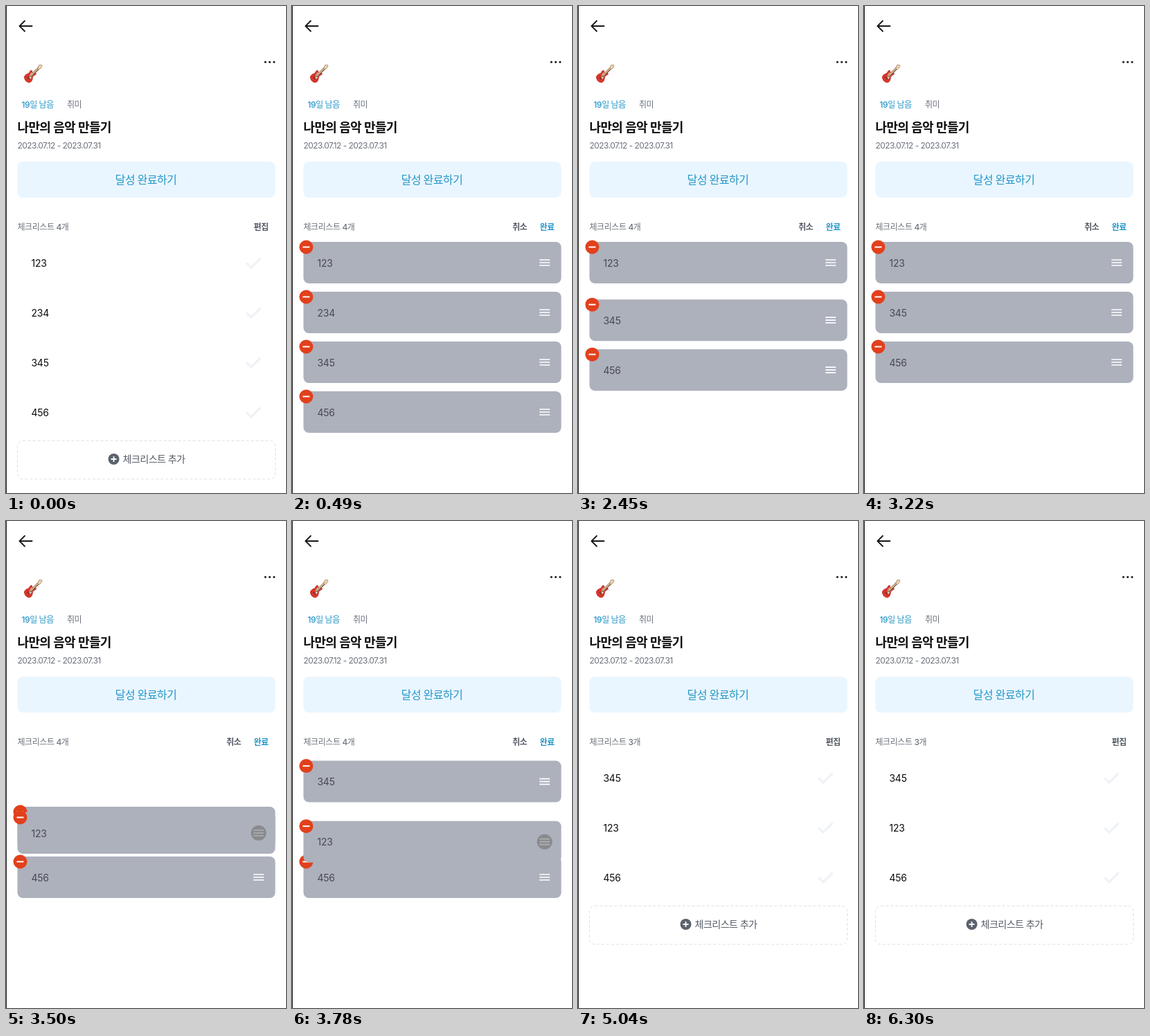
Recreate the animation shown at these times as an HTML page. Size 404 by 704 pixels, loop 7000 ms.

```html
<!DOCTYPE html>
<html lang="ko">
<head>
<meta charset="utf-8">
<style>
  html, body { margin: 0; width: 100%; height: 100%; overflow: hidden; background: #fff; }
  svg { display: block; width: 404px; height: 704px; }
  text { font-family: Inter, "Noto Sans CJK KR", "Noto Sans CJK", sans-serif; font-size: 12px; letter-spacing: -.035em; fill: #6b717c; }
  .semi { font-weight: 600; }
  .mid { font-weight: 500; }
  .blue { fill: #2496c8; }
  .dark { fill: #555b66; }
  .label { font-size: 14px; letter-spacing: -.02em; fill: #0c0d0f; }
  .edit .label { fill: #474a52; }
  .line { fill: none; stroke-linecap: round; stroke-linejoin: round; }
</style>
</head>
<body>
<svg viewBox="0 0 404 704">
  <defs>
    <g id="check"><path class="line" d="M348 372.500l5.800 5.500 12.700-12.500" stroke="#eff2f7" stroke-width="3.300"/></g>
    <g id="card">
      <rect x="16.500" y="341" width="372" height="60" rx="8" fill="#adb1bc"/>
      <path d="M357 367h15M357 371h15M357 375h15" stroke="#fff" stroke-width="1.700"/>
      <circle cx="20.500" cy="348.500" r="10" fill="#e2401c"/>
      <path d="M15.500 348.500h10" stroke="#fff" stroke-width="2"/>
    </g>
  </defs>
  <rect width="404" height="704" fill="#fff"/>
  <rect width="1" height="704" fill="#161616"/>
  <path class="line" d="M37.500 29H20M27 21.500L19.500 29l7.500 7.500" stroke="#17181b" stroke-width="1.900"/>
  <g fill="#17181b">
    <circle cx="374.200" cy="81" r="1.600"/><circle cx="380.500" cy="81" r="1.600"/><circle cx="386.800" cy="81" r="1.600"/>
  </g>

  <g id="guitar" class="line">
    <path d="M26.500 103c0-3 3-4.500 5.500-5.500s2-4 4.500-4.500c1.500 0 1 2.500 2 3.500s4 0 5 1c.5 2-3.500 2.500-4.500 4.500s-.5 6-3.500 8c-4 2-9-2-9-7z" fill="#dc3429" stroke="#b52a24" stroke-width=".7"/>
    <path d="M34 100l3-4 3 3-3.500 4.500-2 3z" fill="#f4ece2"/>
    <path d="M36 101L47.500 89.500" stroke="#70513e" stroke-width="3.200"/>
    <path d="M36 100.500L47 89.500" stroke="#e8c795" stroke-width="1.700"/>
    <path d="M46 90l1.500-4.500 3.500-.5 1 1.500-2 3.500-2.500 2z" fill="#f0d6aa" stroke="#927158" stroke-width=".7"/>
    <path d="M31 103l3 3" stroke="#59413e" stroke-width="1.500"/>
  </g>

  <text x="22.500" y="147" class="mid blue">19일 남음</text>
  <text x="88" y="147" class="mid">취미</text>
  <text x="16.500" y="182" class="semi" style="font-size:18px;fill:#0c0d0f">나만의 음악 만들기</text>
  <text x="16.500" y="206" style="letter-spacing:-.045em">2023.07.12 - 2023.07.31</text>
  <rect x="16.500" y="225" width="372" height="52" rx="8" fill="#eaf6ff"/>
  <text x="157.500" y="257" class="mid blue" style="font-size:16px">달성 완료하기</text>
  <text x="16.500" y="323.500" class="mid" id="count"></text>

  <g id="view">
    <text x="357.500" y="323.500" class="semi dark">편집</text>
    <g id="rows"></g>
    <g id="add">
      <rect x="16.500" y="628.500" width="372" height="55.500" rx="8" fill="none" stroke="#dfe1e5" stroke-dasharray="4 3"/>
      <circle cx="155.500" cy="655" r="8" fill="#5b626d"/>
      <path d="M151.500 655h8M155.500 651v8" stroke="#fff" stroke-width="1.800"/>
      <text x="168.500" y="660.300" class="mid dark" style="font-size:14px">체크리스트 추가</text>
    </g>
  </g>

  <g id="editor" class="edit">
    <text x="318" y="323.500" class="semi dark">취소</text>
    <text x="357.500" y="323.500" class="semi blue">완료</text>
    <g id="cards"></g>
    <circle id="touch" cx="364.500" cy="371" r="11" fill="#656565" fill-opacity=".52"/>
  </g>
</svg>
<script>
const LOOP = 7000, TICK = 70, ROW = 72;
const EDIT = 490, REMOVE = 2310, DONE = 5040;
const DRAG = [[3220, 0], [3290, 2], [3360, 14], [3430, 38], [3500, 80], [3570, 92], [3640, 94],
  [3850, 92], [3920, 86], [3990, 77], [4060, 73], [4130, 72]];
const $ = id => document.getElementById(id);

function makeItems(parent, shape, names) {
  return Object.fromEntries(names.map(name => {
    $(parent).insertAdjacentHTML('beforeend',
      `<g><use href="#${shape}"/><text class="label" x="36.500" y="376.800">${name}</text></g>`);
    return [name, $(parent).lastElementChild];
  }));
}
const rows = makeItems('rows', 'check', ['123', '234', '345', '456']);
// The dragged card comes last so that it covers the others.
const cards = makeItems('cards', 'card', ['234', '345', '456', '123']);

const show = (el, on) => el.setAttribute('display', on ? 'inline' : 'none');
const shift = (el, y) => el.setAttribute('transform', `translate(0 ${y.toFixed(2)})`);

// cubic-bezier(.4, 0, .1, 1)
function ease(x) {
  if (x <= 0) return 0;
  if (x >= 1) return 1;
  let lo = 0, hi = 1;
  for (let i = 0; i < 20; i++) {
    const s = (lo + hi) / 2, r = 1 - s;
    if (1.2 * r * r * s + .3 * r * s * s + s ** 3 < x) lo = s; else hi = s;
  }
  return lo * lo * (3 - 2 * lo);
}
const slide = (t, start) => ROW * ease((t - start) / 450);

function along(points, t) {
  if (t <= points[0][0]) return points[0][1];
  const i = points.findIndex(p => p[0] >= t);
  if (i < 0) return points.at(-1)[1];
  const [t0, a] = points[i - 1], [t1, b] = points[i];
  return a + (b - a) * (t - t0) / (t1 - t0);
}

function draw(t) {
  const editing = t >= EDIT && t < DONE, removed = t >= REMOVE, saved = t >= DONE;
  show($('view'), !editing);
  show($('editor'), editing);
  $('count').textContent = `체크리스트 ${saved ? 3 : 4}개`;

  const order = saved ? ['345', '123', '456'] : ['123', '234', '345', '456'];
  for (const name in rows) {
    show(rows[name], order.includes(name));
    shift(rows[name], order.indexOf(name) * ROW);
  }
  shift($('add'), saved ? -ROW : 0);

  const close = removed ? slide(t, 2215) : 0;
  const drag = along(DRAG, t);
  show(cards['234'], !removed);
  shift(cards['234'], ROW);
  shift(cards['345'], 2 * ROW - close - slide(t, 3495));
  shift(cards['456'], 3 * ROW - close);
  shift(cards['123'], drag);
  shift($('touch'), drag);
  show($('touch'), t >= 3290 && t < 3920);
}

const origin = performance.now();
function frame() {
  const t = (performance.now() - origin) % LOOP;
  draw(Math.floor(t / TICK) * TICK);
  requestAnimationFrame(frame);
}
frame();
</script>
</body>
</html>
```
